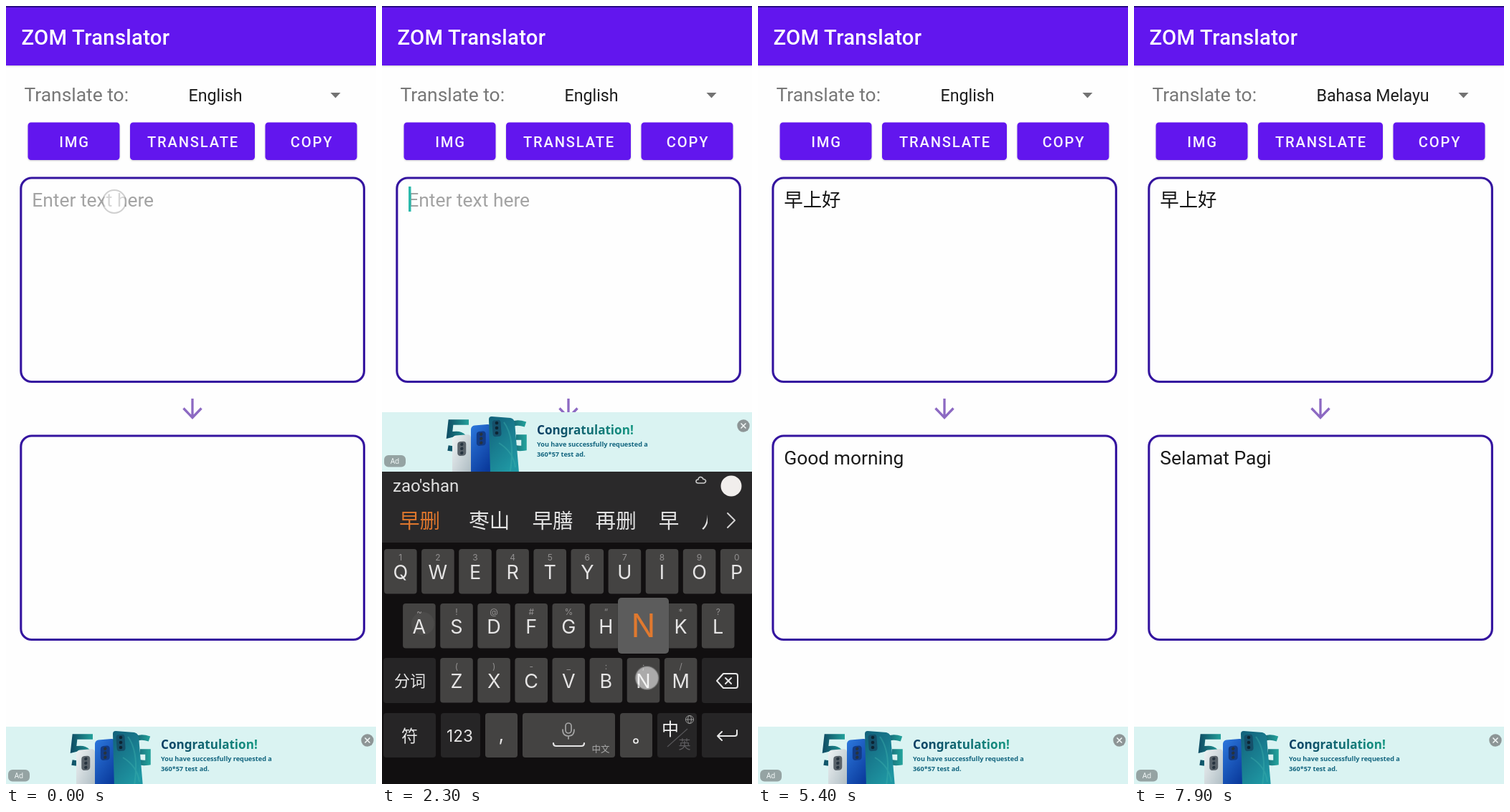
An HTML page for the animation above (8 s loop, 516x1086 px).

```html
<!DOCTYPE html>
<html lang="en">
<head>
<meta charset="utf-8">
<title>Translator demo</title>
<style>
  html, body { margin: 0; width: 100%; height: 100%; overflow: hidden; background: #fefefe; }
  svg { display: block; width: 100%; height: 100%; }
  text { font-family: Roboto, "Noto Sans CJK SC", "Noto Sans CJK", sans-serif; white-space: pre; }
  .label { font-size: 26.4px; }
  .item { font-size: 23.2px; fill: #1c1c1c; }
  .btn { font-size: 20.2px; font-weight: 500; letter-spacing: 1.8px; fill: #f6f0ff; }
  .key { font-family: Inter, "Noto Sans CJK SC", sans-serif; font-size: 27px; font-weight: 400; fill: #e6e5e5; }
  .hint { font-family: Inter, "Noto Sans CJK SC", sans-serif; font-size: 12px; fill: #929090; }
  .han { font-family: "Noto Sans CJK SC", "Noto Sans CJK", sans-serif; }
  .mid { text-anchor: middle; }
  .ad { font-family: "Noto Sans", "Open Sans", sans-serif; }
  .icon { fill: none; stroke: #d2d1d1; stroke-width: 2; stroke-linecap: round; stroke-linejoin: round; }
</style>
</head>
<body>
<svg id="stage" viewBox="0 0 516 1086" preserveAspectRatio="none"></svg>
<script>
const LOOP = 8000;
const stage = document.getElementById('stage');

// Markup helpers
const rect = (x, y, w, h, fill, rx = 0, more = '') =>
  `<rect x="${x}" y="${y}" width="${w}" height="${h}" rx="${rx}" fill="${fill}" ${more}/>`;
const text = (x, y, str, cls = '', more = '') =>
  `<text x="${x}" y="${y}" class="${cls}" ${more}>${str}</text>`;
const path = (d, more = '') => `<path d="${d}" ${more}/>`;
const circle = (x, y, r, more = '') => `<circle cx="${x}" cy="${y}" r="${r}" ${more}/>`;
const gradient = (id, from, to, x2 = 1, y2 = 0) =>
  `<linearGradient id="${id}" x1="0" y1="0" x2="${x2}" y2="${y2}">
    <stop stop-color="${from}"/><stop offset="1" stop-color="${to}"/></linearGradient>`;

// Keyboard layout
const KEY = '#444342', DARK = '#262526', PITCH = 52.1;
const rows = [
  { x: 25.8, y: 758, keys: 'QWERTYUIOP', hints: '1234567890' },
  { x: 51.9, y: 834, keys: 'ASDFGHJKL', hints: '~!@#%“”*?' },
  { x: 104, y: 910, keys: 'ZXCVBNM', hints: '()-_:;/' }
];
const keyPos = {};
const letterKeys = rows.map(row => [...row.keys].map((ch, i) => {
  const x = row.x + i * PITCH;
  keyPos[ch] = { x, y: row.y };
  return rect(x - 22.8, row.y, 45.6, 62.5, KEY, 4) +
    text(x, row.y + 16, row.hints[i], 'hint mid') +
    text(x, row.y + 42, ch, 'key mid');
}).join('')).join('');

const functionKeys =
  rect(2, 910, 73, 63, DARK, 4) + text(39, 950, '分词', 'han mid', 'font-size="22" fill="#e6e6e6"') +
  rect(446, 910, 75, 63, DARK, 4) +
  `<g class="icon" style="stroke:#e6e6e6">${path('M467 942l9-10h17q3 0 3 3v14q0 3-3 3h-17z')}${path('M479 938l8 8m0-8l-8 8')}</g>` +
  rect(2, 987, 73, 62, DARK, 4) + text(38.5, 1026.5, '符', 'han mid', 'font-size="23" fill="#e6e6e6"') +
  rect(82, 987, 55, 62, DARK, 4) + text(108.5, 1026.5, '123', 'key mid', 'style="font-size:22.5px"') +
  rect(144, 987, 45, 62, KEY, 4) + text(166.5, 1026, ',', 'key mid') +
  rect(196, 987, 129, 62, KEY, 4) +
  `<g class="icon" style="stroke:#a5a5a5;stroke-width:1.7">
    ${rect(256, 1001, 8, 14, 'none', 4)}${path('M252 1010q0 9 8 9t8-9M260 1019v4')}
    ${path('M239 1029q0 4 4 4h35q4 0 4-4', 'style="stroke:#e5e5e5;stroke-width:2.2"')}</g>` +
  text(305, 1042, '中文', 'han mid', 'font-size="12.5" fill="#aaa"') +
  rect(332, 987, 45, 62, KEY, 4) + circle(354, 1026, 3, 'fill="none" stroke="#eee" stroke-width="1.7"') +
  rect(384, 987, 55, 62, DARK, 4) +
  text(402, 1018, '中', 'han mid', 'font-size="24" fill="#f2f2f2"') +
  text(422, 1037, '英', 'han mid', 'font-size="17" fill="#5e5d60"') +
  path('M398 1034l28-25', 'stroke="#565558" stroke-width="1.3"') +
  `<g fill="none" stroke="#999" stroke-width="1">${circle(429, 996, 5.5)}
    <ellipse cx="429" cy="996" rx="2.4" ry="5.5"/>${path('M423.5 996h11')}</g>` +
  rect(446, 987, 75, 62, DARK, 4) +
  path('M495 1011v5q0 3-3 3h-24m6-6l-6 6 6 6', 'class="icon" style="stroke:#e6e6e6"');

const toolbar = `<g id="tools">
  ${rect(20, 703, 30, 30, '#dcdcdc', 3)}
  <g class="icon">
    ${circle(110, 718, 14)}${path('M104 722q6 7 12 0')}
    ${circle(105.5, 714, .8)}${circle(114.5, 714, .8)}
    ${rect(172.5, 705.5, 27, 25, 'none', 3)}
    ${path('M179 713h.1m6.9 0h.1m6.9 0h.1M179 718h.1m6.9 0h.1m6.9 0h.1M180 725h12')}
    ${rect(257, 704, 10, 18, 'none', 5)}${path('M251 715q0 12 11 12t11-12M262 727v5')}
    ${path('M325 731q8-22 18-26 5 3 1 8l-4 1 3 2q-4 9-14 9m-4 6h25M326 706v4m-2-2h4M347 718v6m-3-3h6')}
    ${circle(411, 716, 10.5)}${path('M419 724l6 6M477 714l10 10 10-10')}
  </g></g>`;

const candidateBar = `<g id="typing">
  <text id="pinyin" x="15" y="678" font-size="24" fill="#e0e0e0"></text>
  ${path('M441 666h8q3-1 2.5-3.500-1-2.500-3.500-2-1-3.500-4.500-3-2.500 1-2.500 3.500-3 0-3 2.500t3 2.500z', 'fill="none" stroke="#ccc" stroke-width="1.5"')}
  <g id="cands" clip-path="url(#candClip)"></g>
  ${path('M482 708l10 10-10 10', 'class="icon"')}</g>`;

const keyboard = `<g id="kbd">
  ${rect(0, 650, 516, 440, '#110f10')}${rect(0, 650, 516, 99, '#2a292a')}
  ${toolbar}${candidateBar}
  ${circle(487, 670, 14.5, 'fill="#f1eeec"')}
  ${letterKeys}${functionKeys}
  <g id="pop">${rect(-35.5, 0, 71, 78, '#5c5c5c', 5, 'filter="url(#soft)"')}
    <text id="popText" y="55" class="key mid" style="font-size:45px;fill:#e0792f"></text></g>
</g>`;

// App screen
const button = (x, w, label) => rect(x, 162.5, w, 52.5, '#6215ee', 4.5, 'filter="url(#soft)"') +
  text(x + w / 2 + 1, 197, label, 'btn mid');
const field = y => rect(20.8, y, 478.6, 284.5, '#fefefe', 15, 'stroke="#34149f" stroke-width="3.1"');

const phone = (x, y, w, h, skew, fill, lens) => `<g transform="translate(${x} ${y}) skewY(${skew})">
  ${rect(0, 0, w, h, `url(#${fill})`, 5)}${rect(w * .28, 9, w * .46, 20, lens, 4)}
  ${[0, 1, 2].map(i => circle(w * .51, 13 + i * 6, 2.2, 'fill="#26333f"')).join('')}</g>`;

const ad = `<g id="ad">${rect(0, 0, 516, 520, '#fefefe')}${rect(0, 0, 516, 83, '#daf3f2')}
  <g clip-path="url(#adClip)">
  ${path('M121 14H96l-2 18q20-5 22 8-1 14-24 10', 'fill="none" stroke="url(#teal)" stroke-width="7.5"')}
  ${path('M200 17q-24-8-26 16 1 20 24 17V35h-11', 'fill="none" stroke="url(#teal)" stroke-width="7.5"')}
  ${phone(98, 33, 26, 60, -5, 'silver', '#59626a')}
  ${phone(124, 19, 28, 75, -5, 'blue', '#123b86')}
  ${path('M149 10q0-4 4-4l26 2q5 1 6 6l6 70h-40z', 'fill="url(#green)"')}
  ${rect(154, 11, 12, 23, '#15506a', 4, 'transform="rotate(-4 160 22)"')}
  ${[15, 22, 29].map(y => circle(160, y, 2.3, 'fill="#0d2533"')).join('')}
  ${path('M170 14q16 22 9 68M163 43q20 12 23 34', 'fill="none" stroke="#3fb2ad" stroke-opacity=".4" stroke-width="2"')}
  </g>
  ${text(216, 31, 'Congratulation!', 'ad', 'font-size="17.1" font-weight="700" fill="url(#headline)"')}
  ${text(216, 48, 'You have successfully requested a', 'ad', 'font-size="9.15" font-weight="600" fill="#12657f"')}
  ${text(216, 61.5, '360*57 test ad.', 'ad', 'font-size="9.15" font-weight="600" fill="#12657f"')}
  ${rect(3, 60, 30, 16.5, '#95a3a3', 6)}${text(18, 72, 'Ad', 'ad mid', 'font-size="10" fill="#f0f6f6"')}
  ${circle(504, 19, 8.7, 'fill="#8d9596"')}
  ${path('M500.5 15.5l7 7m0-7l-7 7', 'stroke="#f3f8f8" stroke-width="1.5"')}</g>`;

const languages = ['English', 'Chinese', 'Bahasa Melayu', 'German', 'Japanese'];
const menu = `<g id="menu">${rect(248, 106, 181, 305, '#fefefe', 1, 'filter="url(#lift)"')}
  <g clip-path="url(#menuClip)">${rect(248, 226, 181, 69, '#e2e2e2', 0, 'id="picked"')}
  ${languages.map((name, i) => text(258.5, 130 + i * 69, name, 'item')).join('')}</g></g>`;

stage.innerHTML = `<defs>
  ${gradient('teal', '#0f4f66', '#23a09a')}${gradient('silver', '#eef2f3', '#a9b8bf', 1, 1)}
  ${gradient('blue', '#2c77dc', '#0a3a9c', .5, 1)}${gradient('green', '#12607a', '#1f97a3', .6, 1)}
  ${gradient('headline', '#0c3d63', '#159682')}
  <filter id="soft" x="-20%" y="-20%" width="140%" height="150%"><feDropShadow dx="0" dy="1" stdDeviation="1.2" flood-opacity=".2"/></filter>
  <filter id="lift" x="-30%" y="-20%" width="160%" height="150%"><feDropShadow dx="0" dy="7" stdDeviation="9" flood-opacity=".27"/></filter>
  <clipPath id="menuClip">${rect(248, 106, 181, 305, '#000')}</clipPath>
  <clipPath id="candClip">${rect(0, 690, 454, 58, '#000')}</clipPath>
  <clipPath id="adClip">${rect(85, 0, 125, 83, '#000')}</clipPath></defs>
  ${rect(0, 0, 516, 1086, '#fefefe')}
  ${rect(0, 0, 516, 83, '#6215ee', 0, 'filter="url(#soft)"')}${rect(0, 0, 516, 2, '#2a0b86')}
  ${text(21.5, 54, 'ZOM Translator', '', 'font-size="29.2" font-weight="500" letter-spacing=".3" fill="#fff"')}
  ${text(25.5, 133, 'Translate to:', 'label', 'fill="#777"')}
  ${circle(460, 124, 28.5, 'id="ripple" fill="#e8e8e8"')}
  <text id="lang" x="254.5" y="133" class="item"></text>
  ${path('M452.5 121h14l-7 7.5z', 'fill="#737373"')}
  ${button(30.5, 128, 'IMG')}${button(173, 174, 'TRANSLATE')}${button(361.5, 128, 'COPY')}
  ${rect(173, 162.5, 174, 52.5, '#fff', 4.5, 'id="flash"')}
  ${field(240)}${field(600)}
  <text id="input" x="36.3" y="280" class="label"></text>
  ${rect(37, 252, 3.5, 35, '#2bb9ab', 0, 'id="caret"')}
  <text id="output" x="36.3" y="640" class="label" fill="#1a1a1a"></text>
  ${path('M260 548v26m-12.5-12.5L260 574.5l12.5-13', 'fill="none" stroke="#8c69c2" stroke-width="3.3"')}
  ${ad}${keyboard}${menu}
  <g id="touch">${circle(0, 0, 16, 'fill="#fff" fill-opacity=".55" stroke="#8a8a8a" stroke-opacity=".4" stroke-width="2"')}</g>
  <g id="trail">${circle(0, 0, 16, 'fill="#fff" fill-opacity=".4"')}</g>`;

const el = {};
stage.querySelectorAll('[id]').forEach(node => el[node.id] = node);

// Timeline, in ms
const TYPE_START = 1150, TYPE_STEP = 185, COMMIT = 3240;
const OPEN = 300, CLOSE = 3620, MENU_OPEN = 5780, MENU_CLOSE = 6680;
const typed = 'zaoshanghao';
const words = [
  '在 子 中 这 走 做', '咋 扎 杂 砸 炸 匝', '早 找 造 遭 枣 噪',
  '早上 早睡 造势 遭受 早 找', '早上 遭受 早睡 造势 早 找', '早啥 早杀 找啥 造啥 早 找',
  '早删 枣山 早膳 再删 早 八', '早上 枣上 遭上 造上 早 找',
  '早上好 早上会 早上 早 找', '早上好 早上哈 早上 早 找', '早上好 早上号 早上 早 找'
];
// Each tap: start, hold time, x, y
const taps = [
  [-100, 220, 151, 273],
  ...[...typed.toUpperCase()].map((ch, i) => {
    const k = keyPos[ch];
    return [TYPE_START + i * TYPE_STEP, 110, k.x + 5, k.y + 28];
  }),
  [3180, 100, 52, 718], [3440, 130, 487, 718], [4080, 120, 260, 190],
  [5650, 120, 460, 124], [6520, 130, 338, 260], [7350, 120, 260, 190]
];

const clamp = v => Math.max(0, Math.min(1, v));
const ease = v => 1 - (1 - clamp(v)) ** 3;
const show = (node, on) => node.setAttribute('visibility', on ? 'visible' : 'hidden');
const fade = (node, v) => node.setAttribute('opacity', v.toFixed(3));
const move = (node, x, y) => node.setAttribute('transform', `translate(${x} ${y})`);
const write = (node, str) => { if (node.textContent !== str) node.textContent = str; };

function pinyin(n) {
  return [typed.slice(0, Math.min(n, 3)), typed.slice(3, Math.min(n, 8)), typed.slice(8, n)]
    .filter(Boolean).join("'");
}

let shownWords = -1;
function setWords(n) {
  if (n === shownWords) return;
  shownWords = n;
  let x = 24;
  el.cands.innerHTML = n < 1 ? '' : words[n - 1].split(' ').map((word, i) => {
    const out = text(x, 729, word, 'han', `font-size="28.6" fill="${i ? '#e3e3e3' : '#dd762d'}"`);
    x += word.length * 28.6 + (i ? 31 : 40);
    return out;
  }).join('');
}

function drawTaps(t) {
  let last = -1;
  taps.forEach((tap, i) => { if (t >= tap[0]) last = i; });
  [[el.touch, last], [el.trail, last - 1]].forEach(([node, i]) => {
    if (i < 0) return fade(node, 0);
    const [start, hold, x, y] = taps[i];
    move(node, x, y);
    fade(node, 1 - clamp((t - start - hold) / 130));
  });
}

function drawKeyboard(t) {
  const up = t < CLOSE ? ease((t - OPEN) / 280) : 1 - clamp((t - CLOSE) / 220) ** 2;
  move(el.kbd, 0, 440 * (1 - up));
  move(el.ad, 0, t >= OPEN + 40 && t < CLOSE + 60 ? 567 : 1006);

  const step = Math.floor((t - TYPE_START) / TYPE_STEP);
  const count = t < COMMIT ? Math.max(0, Math.min(typed.length, step + 1)) : 0;
  show(el.tools, !count);
  show(el.typing, count);
  write(el.pinyin, pinyin(count));
  setWords(count);

  const down = step >= 0 && step < typed.length && t - TYPE_START - step * TYPE_STEP < 125;
  show(el.pop, down);
  if (down) {
    const ch = typed[step].toUpperCase();
    move(el.pop, keyPos[ch].x, keyPos[ch].y - 84);
    write(el.popText, ch);
  }
}

function drawApp(t) {
  const done = t >= COMMIT;
  write(el.input, done ? '早上好' : 'Enter text here');
  el.input.setAttribute('fill', done ? '#151515' : '#a3a3a3');
  const blink = done ? t - COMMIT : t - 250;
  show(el.caret, t >= 250 && t < CLOSE && blink % 1000 < 500);
  el.caret.setAttribute('x', done ? 115.3 : 37);

  write(el.output, t < 4380 ? '' : t < 7680 ? 'Good morning' : 'Selamat Pagi');
  write(el.lang, t < MENU_CLOSE ? 'English' : 'Bahasa Melayu');
  const flash = Math.max(...[4080, 7350].map(s => t < s ? 0 : 1 - clamp((t - s - 150) / 200)));
  fade(el.flash, flash * .2);

  fade(el.ripple, clamp((t - 5650) / 100) * (1 - clamp((t - MENU_CLOSE) / 150)));
  fade(el.menu, clamp((t - MENU_OPEN) / 130) * (1 - clamp((t - MENU_CLOSE) / 110)));
  fade(el.picked, t < 6520 ? 0 : 1);
}

function frame(now) {
  const t = now % LOOP;
  drawApp(t);
  drawKeyboard(t);
  drawTaps(t);
}

const begin = performance.now();
function tick() {
  frame(performance.now() - begin);
  requestAnimationFrame(tick);
}
tick();
</script>
</body>
</html>
```
